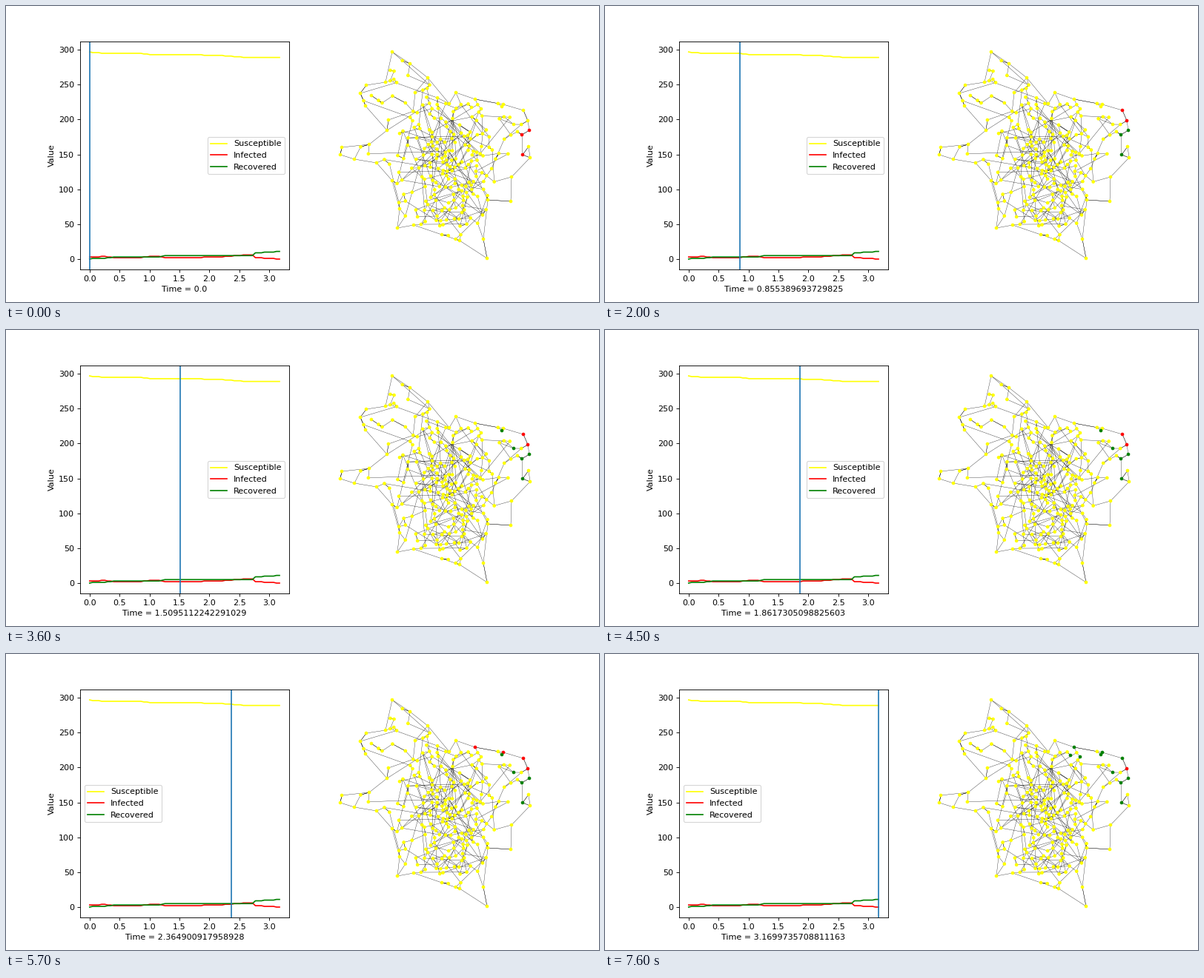
A matplotlib script that plays this animation: 800 px wide and 400 px high, repeating every 7.7 s.

```python
import numpy as np
import matplotlib.pyplot as plt
from matplotlib.animation import FuncAnimation
from matplotlib.collections import LineCollection
from matplotlib.path import Path

POPULATION = 300
NODE_COUNT = 262
FRAMES = 77
STEPS = 64
DT = 3.1699735708811163 / (STEPS - 1)
START = -9  # ill before the first step
LAG = 2     # the network trails the chart by this many steps

# x, y, step of infection, step of recovery; the first RIM_CASES lie on the outline
CASES = np.array([
    (633, 126, 45, 55), (671, 133, 38, 55), (698, 141, 4, 58), (704, 155, 1, 62),
    (706, 168, START, 8), (696, 174, START, 1), (697, 201, START, 6),
    (628, 137, 48, 55), (641, 139, 51, 55), (669, 136, 20, 25), (685, 160, 18, 24),
])
RIM_CASES = 7

# Key points of the network's outline, in pixels from the top left corner
OUTLINE = [
    (705, 190), (707, 205), (682, 231), (681, 264), (650, 262), (644, 315), (649, 341),
    (612, 317), (588, 309), (550, 296), (528, 300), (531, 274), (521, 236), (500, 212),
    (470, 207), (451, 201), (453, 191), (490, 187), (514, 168), (485, 135), (478, 118),
    (486, 107), (512, 103), (521, 62), (545, 78), (569, 97), (598, 132), (607, 117),
]


def fill_nodes(rng, fixed, outline):
    """Add nodes inside the outline: a dense column and an even spread."""
    shape = Path(outline)
    nodes = list(fixed)
    while len(nodes) < NODE_COUNT:
        if rng.random() < 0.5:
            point = rng.normal((596, 215), (24, 50))
        else:
            point = rng.uniform((450, 60), (700, 320))
        gap = np.hypot(*(np.array(nodes) - point).T).min()
        if gap > 4.5 and shape.contains_point(point):
            nodes.append(point)
    return np.array(nodes, float)


def build_network():
    rng = np.random.default_rng(12)
    spots = CASES[:, :2]
    rim = np.vstack([spots[:RIM_CASES], OUTLINE])
    nodes = fill_nodes(rng, np.vstack([spots, OUTLINE]), rim)
    edges = [rim[[i - 1, i]] for i in range(len(rim))]

    # Every node reaches its nearest neighbour; inner ones also a farther one
    rim_end = len(CASES) + len(OUTLINE)
    for i, node in enumerate(nodes):
        dist = np.hypot(*(nodes - node).T)
        dist[i] = np.inf
        partners = [np.argmin(dist)]
        if i >= rim_end:
            weight = np.exp(-dist / 18)
            partners.append(rng.choice(NODE_COUNT, p=weight / weight.sum()))
        edges += [nodes[[i, j]] for j in partners]
    return nodes, edges


def case_states(step):
    """0 susceptible, 1 infected, 2 recovered."""
    return (step >= CASES[:, 2:]).sum(axis=1)


nodes, edges = build_network()

fig = plt.figure(figsize=(10, 5), dpi=80)

chart = fig.add_subplot(1, 2, 1)
times = np.arange(STEPS) * DT
states = np.array([case_states(step) for step in range(STEPS)])
infected, recovered = (states == 1).sum(axis=1), (states == 2).sum(axis=1)
chart.plot(times, POPULATION - infected - recovered, color="yellow", label="Susceptible")
chart.plot(times, infected, color="red", label="Infected")
chart.plot(times, recovered, color="green", label="Recovered")
chart.set_ylabel("Value")
chart.legend(loc="best")
marker = chart.axvline(0, color="tab:blue")

stage = fig.add_axes([0, 0, 1, 1])
stage.set(xlim=(0, 800), ylim=(400, 0))
stage.axis("off")
stage.add_collection(LineCollection(edges, colors="black", linewidths=0.3, zorder=1))
dots = stage.scatter(*nodes.T, s=10, linewidths=1, c="yellow", zorder=2)
hues = np.array(["yellow", "red", "green"])


def update(frame):
    # Steps last 120 ms, shown on a 100 ms clock
    step = int((frame + 0.5) / 1.2)
    time = float(step * DT)
    marker.set_xdata([time, time])
    chart.set_xlabel(f"Time = {time}")
    healthy = ["yellow"] * (NODE_COUNT - len(CASES))
    dots.set_color(list(hues[case_states(step - LAG)]) + healthy)
    return marker, dots


anim = FuncAnimation(fig, update, frames=FRAMES, interval=100, repeat=True)
plt.show()
```
